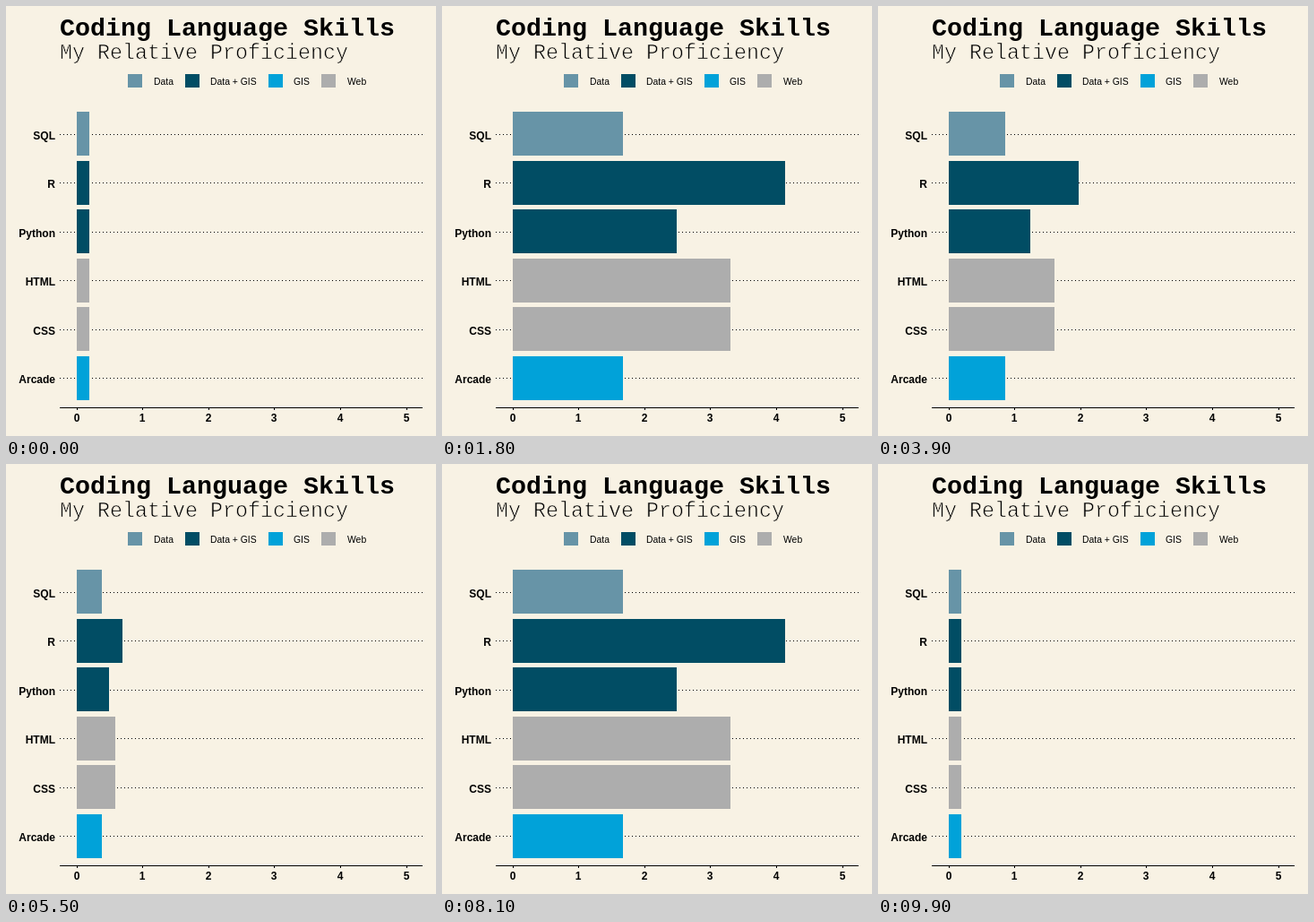
An HTML page with a canvas for the animation above (10000 ms loop, 480 by 480 pixels).

```html
<!DOCTYPE html>
<html lang="en">
<head>
<meta charset="utf-8">
<title>Coding Language Skills</title>
<style>
  html, body { margin: 0; height: 100%; overflow: hidden; background: #f8f2e4; }
  canvas { display: block; }
</style>
</head>
<body>
<canvas id="stage" width="480" height="480"></canvas>
<script>
const ctx = document.getElementById("stage").getContext("2d");

const PAPER = "#f8f2e4";
const SANS = '"Liberation Sans", Arial, sans-serif';
const MONO = '"Liberation Mono", "Courier New", monospace';
const COLORS = { "Data": "#6794a7", "Data + GIS": "#014d64", "GIS": "#01a2d9", "Web": "#adadad" };
const LEGEND = [["Data", 136, 165], ["Data + GIS", 200, 228], ["GIS", 293, 321], ["Web", 352, 381]];
const BARS = [
  ["SQL", 2, "Data"],
  ["R", 5, "Data + GIS"],
  ["Python", 3, "Data + GIS"],
  ["HTML", 4, "Web"],
  ["CSS", 4, "Web"],
  ["Arcade", 2, "GIS"]
];

const BASE = 0.2;
const LEFT = 60, RIGHT = 465, AXIS_Y = 448;
const ROW = 54.5, BAR_HEIGHT = 49;
const xAt = value => Math.round(78.55 + value * 73.64);

function rect(color, x, y, w, h) {
  ctx.fillStyle = color;
  ctx.fillRect(x, y, w, h);
}

function text(str, x, y, font, align = "left") {
  ctx.font = font;
  ctx.textAlign = align;
  ctx.fillStyle = "#000";
  ctx.fillText(str, x, y);
}

// A paper-coloured outline trims the strokes to a light weight
function lightText(str, x, y, font) {
  text(str, x, y, font);
  ctx.strokeStyle = PAPER;
  ctx.lineWidth = 0.7;
  ctx.strokeText(str, x, y);
}

const ease = u => (1 - Math.cos(Math.PI * u)) / 2;

// Two rises and falls per loop, in steps of 100 ms
function growth(step) {
  if (step <= 25) return ease(step / 25);
  if (step <= 49) return ease((49 - step) / 24);
  if (step <= 50) return 0;
  if (step <= 74) return ease((step - 50) / 24);
  return ease((99 - step) / 25);
}

function drawHeader() {
  text("Coding Language Skills", 60, 33, "bold 28.33px " + MONO);
  lightText("My Relative Proficiency", 60, 59, "23.33px " + MONO);
  for (const [name, boxX, labelX] of LEGEND) {
    rect(COLORS[name], boxX, 76, 16, 15);
    text(name, labelX, 88, "10.4px " + SANS);
  }
}

function drawAxis() {
  rect("#000", LEFT, AXIS_Y, RIGHT - LEFT, 1);
  for (let v = 0; v <= 5; v++) {
    rect("#000", xAt(v), AXIS_Y, 1, 3);
    text(v, xAt(v), 464, "bold 12px " + SANS, "center");
  }
}

function drawBars(amount) {
  const left = xAt(0);
  BARS.forEach(([name, value, group], i) => {
    const top = Math.round(118 + i * ROW);
    const lineY = Math.floor(143 + i * ROW);
    const right = xAt(BASE + (value - BASE) * amount);
    for (let x = LEFT; x < RIGHT; x += 4) rect("#000", x, lineY, 1, 1);
    rect(COLORS[group], left, top, right - left, BAR_HEIGHT);
    text(name, 55, lineY + 6, "bold 12px " + SANS, "right");
  });
}

function draw() {
  const step = Math.floor(performance.now() % 10000 / 100);
  rect(PAPER, 0, 0, 480, 480);
  drawHeader();
  drawAxis();
  drawBars(growth(step));
  requestAnimationFrame(draw);
}
draw();
</script>
</body>
</html>
```
